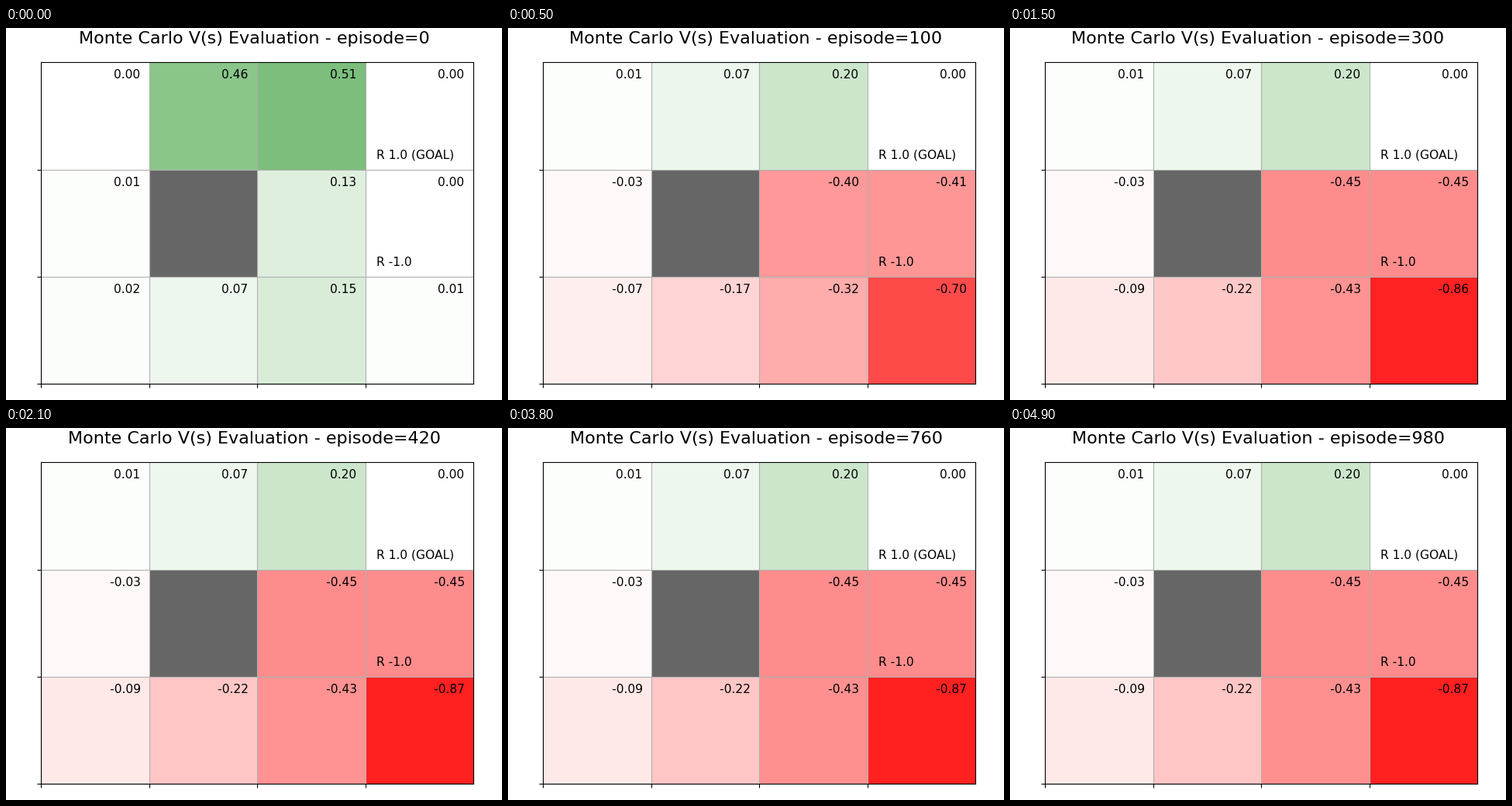
Recreate the animation shown at these times as a matplotlib script. Size 640 by 480 pixels, loop 5 s.

```python
import matplotlib.pyplot as plt
import numpy as np
from matplotlib.animation import FuncAnimation
from matplotlib.colors import LinearSegmentedColormap

FRAMES, INTERVAL, EPISODES_PER_FRAME = 50, 100, 20
ROWS, COLS = 3, 4
WALL, GOAL, TRAP = (1, 1), (0, 3), (1, 3)
WIDTH, HEIGHT, DPI = 640, 480, 100

plt.rcParams["font.family"] = "DejaVu Sans"

# Estimates after the first episode and once they have settled.
FIRST = np.array([[0.00, 0.46, 0.51, 0.00],
                  [0.01, 0.00, 0.13, 0.00],
                  [0.02, 0.07, 0.15, 0.01]])
SETTLED = np.array([[0.01, 0.07, 0.20, 0.00],
                    [-0.03, 0.00, -0.45, -0.45],
                    [-0.09, -0.22, -0.43, -0.87]])
# Rows further from the goal settle more slowly.
SETTLING_TIME = np.arange(1, ROWS + 1)[:, None]


def value_grid(frame):
    return SETTLED + (FIRST - SETTLED) * np.exp(-frame / SETTLING_TIME)


def cell_text(cell, dx, dy, text=""):
    row, col = cell
    return ax.text(col + dx, ROWS - row - dy, text, fontsize=11.2)


fig = plt.figure(figsize=(WIDTH / DPI, HEIGHT / DPI), dpi=DPI, facecolor="white")
left, right, top, bottom = 45.1, 603.1, 44.45, 459.45
ax = fig.add_axes([left / WIDTH, 1 - bottom / HEIGHT,
                   (right - left) / WIDTH, (bottom - top) / HEIGHT])
ax.set(xlim=(0, COLS), ylim=(0, ROWS), xticks=range(COLS), yticks=range(ROWS))
ax.tick_params(labelbottom=False, labelleft=False)

cmap = LinearSegmentedColormap.from_list("value", ["red", "white", "green"])
mesh = ax.pcolormesh(np.zeros((ROWS, COLS)), cmap=cmap, vmin=-1, vmax=1)
ax.add_patch(plt.Rectangle((WALL[1], ROWS - WALL[0] - 1), 1, 1, fc="0.4"))
ax.grid(True)

cell_text(GOAL, 0.1, 0.9, "R 1.0 (GOAL)")
cell_text(TRAP, 0.1, 0.9, "R -1.0")
labels = {cell: cell_text(cell, 0.39, 0.15)
          for cell in np.ndindex(ROWS, COLS) if cell != WALL}
title = fig.text(0.5, 1 - 4.17 / HEIGHT, "", fontsize=16, ha="center", va="top")


def update(frame):
    grid = value_grid(frame)
    mesh.set_array(np.flipud(grid))
    for cell, label in labels.items():
        label.set_text(f"{round(grid[cell], 2) + 0.0:12.2f}")
    title.set_text("Monte Carlo V(s) Evaluation - "
                   f"episode={frame * EPISODES_PER_FRAME}")
    return [mesh, title, *labels.values()]


anim = FuncAnimation(fig, update, frames=FRAMES, interval=INTERVAL,
                     repeat=True, repeat_delay=0, blit=False)
plt.show()
```
